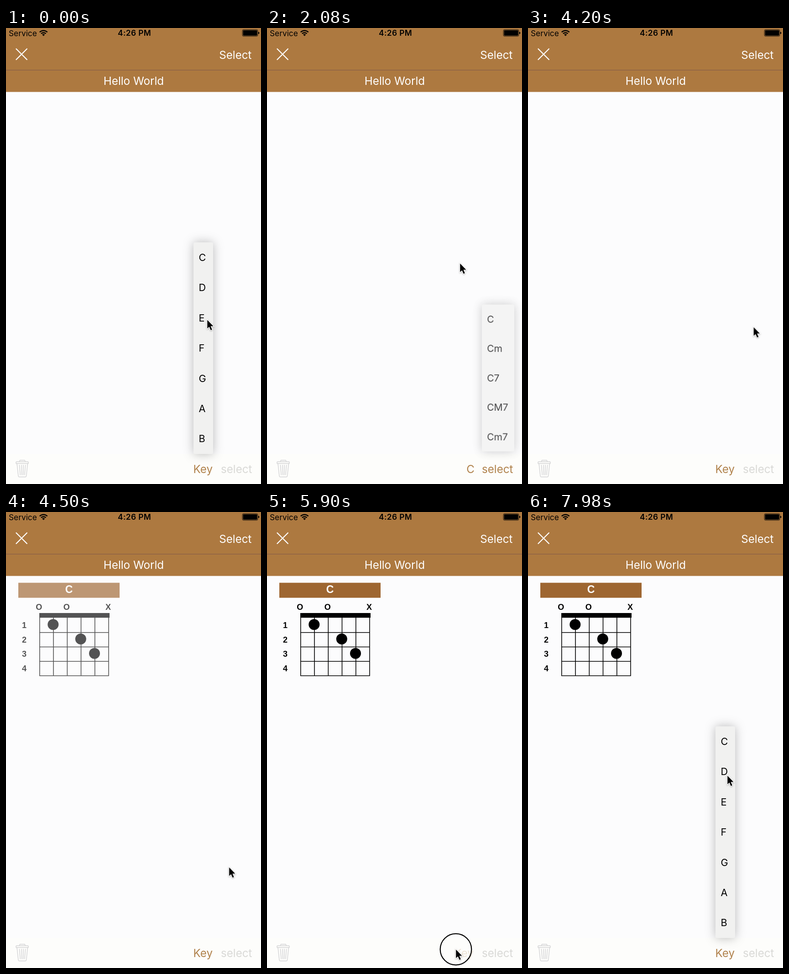
An HTML page for the animation above (8000 ms loop, 559 by 1002 pixels).

```html
<!DOCTYPE html>
<html lang="en">
<head>
<meta charset="utf-8">
<title>Chord picker</title>
<style>
  html, body { margin: 0; width: 100%; height: 100%; overflow: hidden; }
  body { position: relative; background: #fcfcfd; font-family: Inter, Roboto, sans-serif; }
  svg { position: absolute; left: 0; top: 0; width: 559px; height: 1002px; }

  .bar { font-size: 24.2px; }
  .brown { fill: #b0824c; }
  .grey { fill: #d9d9d6; }
  .chord { font: bold 18px "Liberation Sans", Arial, sans-serif; text-anchor: middle; }

  .menu {
    position: absolute; top: 470.5px; box-sizing: border-box; padding-left: 11.5px;
    background: #f1f1f0; border-radius: 3px; box-shadow: 0 0 22px rgba(85, 85, 85, .4);
    font-size: 21.7px; line-height: 66.4px; white-space: nowrap; color: #000;
  }
  #keys { left: 411px; width: 43px; }
  #kinds { left: 470px; top: 603.3px; width: 73px; }

  /* every track shares one 8 s clock */
  .chord, .menu, .key, .press, .note, .off, .on, #cursor, .ring {
    animation: 8s linear infinite;
  }
  #keys { animation-name: keys; }
  #kinds { animation-name: kinds; }
  .chord { animation-name: chord; }
  .press { animation-name: press; }
  #cursor { animation-name: cursor; }
  .key, .note, .off, .on, .ring { animation-timing-function: step-end; }
  .key { animation-name: key; }
  .note { animation-name: note; }
  .off { animation-name: off; }
  .on { animation-name: on; }
  .ring { animation-name: ring; }

  @keyframes keys {
    0%, 20.25% { opacity: 1; transform: none; }
    22.1% { opacity: 0; transform: scale(.9); }
    79.5% { opacity: 0; transform: scale(.9); animation-timing-function: ease-out; }
    81.4%, 100% { opacity: 1; transform: none; }
  }
  @keyframes kinds {
    0% { opacity: 0; transform: scale(.9); }
    25% { opacity: 0; transform: scale(.9); animation-timing-function: ease-out; }
    26.9%, 49.4% { opacity: 1; transform: none; }
    51.25%, 100% { opacity: 0; transform: scale(.9); }
  }
  @keyframes chord {
    0%, 53.75% { opacity: 0; }
    57.5%, 100% { opacity: 1; }
  }
  @keyframes press {
    0%, 73.2% { opacity: 1; }
    73.25%, 78.1% { opacity: .2; }
    83.75%, 100% { opacity: 1; }
  }
  @keyframes key { 0%, 49.4%, 100% { opacity: 1; } 20.25% { opacity: 0; } }
  @keyframes note { 0%, 49.4%, 100% { opacity: 0; } 20.25% { opacity: 1; } }
  @keyframes off { 0%, 49.4%, 100% { opacity: 1; } 24.4% { opacity: 0; } }
  @keyframes on { 0%, 49.4%, 100% { opacity: 0; } 24.4% { opacity: 1; } }
  @keyframes ring {
    0%, 20%, 48.1%, 78.1%, 100% { opacity: 0; }
    15%, 43.1%, 73.25% { opacity: 1; }
  }
  @keyframes cursor {
    0% { transform: translate(441px, 640px); animation-timing-function: ease-in-out; }
    12% { transform: translate(423px, 516px); }
    28.1% { transform: translate(423px, 516px); animation-timing-function: ease-in-out; }
    39.4% { transform: translate(496px, 622px); }
    50% { transform: translate(496px, 622px); animation-timing-function: ease-in; }
    56.25% { transform: translate(489px, 779px); animation-timing-function: ease-out; }
    66.25% { transform: translate(414px, 960px); }
    83% { transform: translate(414px, 960px); animation-timing-function: ease-in-out; }
    96.5%, 100% { transform: translate(437px, 578px); }
  }
</style>
</head>
<body>
<svg viewBox="0 0 559 1002">
  <rect width="559" height="140.5" fill="#ad7940"/>
  <path d="M0 92.5H559" stroke="#80584a"/>
  <rect y="936" width="559" height="66" fill="#fdfdfb"/>

  <!-- status bar -->
  <text x="6" y="17.5" font-size="17.3">Service</text>
  <g fill="none" stroke="#000" stroke-width="2.6">
    <path d="M73.8 9.2a11.8 11.8 0 0 1 16.8 0M77 12.4a7.3 7.3 0 0 1 10.4 0"/>
    <path d="M79.2 14.4a4.2 4.2 0 0 1 6 0L82.2 17.8z" fill="#000" stroke="none"/>
  </g>
  <text x="281.6" y="17.3" font-size="17.3" font-weight="600" letter-spacing=".4" text-anchor="middle">4:26 PM</text>
  <rect x="518.2" y="3.7" width="33.8" height="14.4" rx="2.6" fill="none" stroke="#000" stroke-width=".9"/>
  <rect x="519.6" y="5.1" width="31" height="11.6" rx="1.4"/>
  <path d="M553 8.5q2.5 .5 2.5 2.4t-2.5 2.4z"/>

  <!-- navigation -->
  <path d="M21.8 45.3L46.5 70M46.5 45.3L21.8 70" stroke="#fff" stroke-width="2.2"/>
  <g class="bar" fill="#fff">
    <text x="538.5" y="68" text-anchor="end">Select</text>
    <text x="280" y="125" text-anchor="middle">Hello World</text>
  </g>

  <!-- toolbar -->
  <g fill="none" stroke="#d3d3d5" stroke-width="1.4" stroke-linejoin="round">
    <path d="M22 957V954.5Q22 953 24 953H47Q49 953 49 954.5V957ZM29 953L30.5 949.7H41L42.5 953"/>
    <path d="M24 957L27 984.5Q27.2 986.5 29 986.5H42.5Q44.3 986.5 44.5 984.5L47.5 957"/>
    <path d="M29.3 960L31.3 982.5M34 960L34.6 982.5M38.2 960L37.6 982.5M42.7 960L40.7 982.5"/>
  </g>
  <g class="bar" text-anchor="end">
    <g class="press"><text class="brown key" x="453" y="978">Key</text></g>
    <text class="brown note" x="455" y="978">C</text>
    <text class="grey off" x="539.5" y="978">select</text>
    <text class="brown on" x="539.5" y="978">select</text>
  </g>

  <!-- chord diagram -->
  <g class="chord">
    <rect x="27" y="155.5" width="222" height="33" fill="#9e6631"/>
    <text x="138" y="178" font-size="23" fill="#fff">C</text>
    <text x="72.3" y="214.5">O</text>
    <text x="132.8" y="214.5">O</text>
    <text x="224" y="214.5">X</text>
    <text x="40" y="255">1</text>
    <text x="40" y="286.7">2</text>
    <text x="40" y="318.4">3</text>
    <text x="40" y="350">4</text>
    <rect x="73" y="222" width="154" height="10.3"/>
    <path fill="none" stroke="#000" stroke-width="1.6" d="M73.8 230V359.8H225V230M104 230v130M134.3 230v130M164.5 230v130M194.8 230v130M73 264.8H225M73 296.5H225M73 328.2H225"/>
    <circle cx="103.3" cy="247.3" r="12"/>
    <circle cx="163.8" cy="279" r="12"/>
    <circle cx="194" cy="310.8" r="12"/>
  </g>
</svg>

<div class="menu" id="keys">C<br>D<br>E<br>F<br>G<br>A<br>B</div>
<div class="menu" id="kinds">C<br>Cm<br>C7<br>CM7<br>Cm7</div>

<svg viewBox="0 0 559 1002">
  <g id="cursor">
    <circle class="ring" cy="1" r="34.3" fill="none" stroke="#000" stroke-width="2.2"/>
    <path d="M.3 1.5V20.3L4.5 16.4L7.8 24L10.8 22.7L7.6 15.2H13.5Z" stroke="#fff" stroke-width="2.4"
      paint-order="stroke" style="filter: drop-shadow(0 1.5px 1.5px rgba(0, 0, 0, .3))"/>
  </g>
</svg>
</body>
</html>
```
